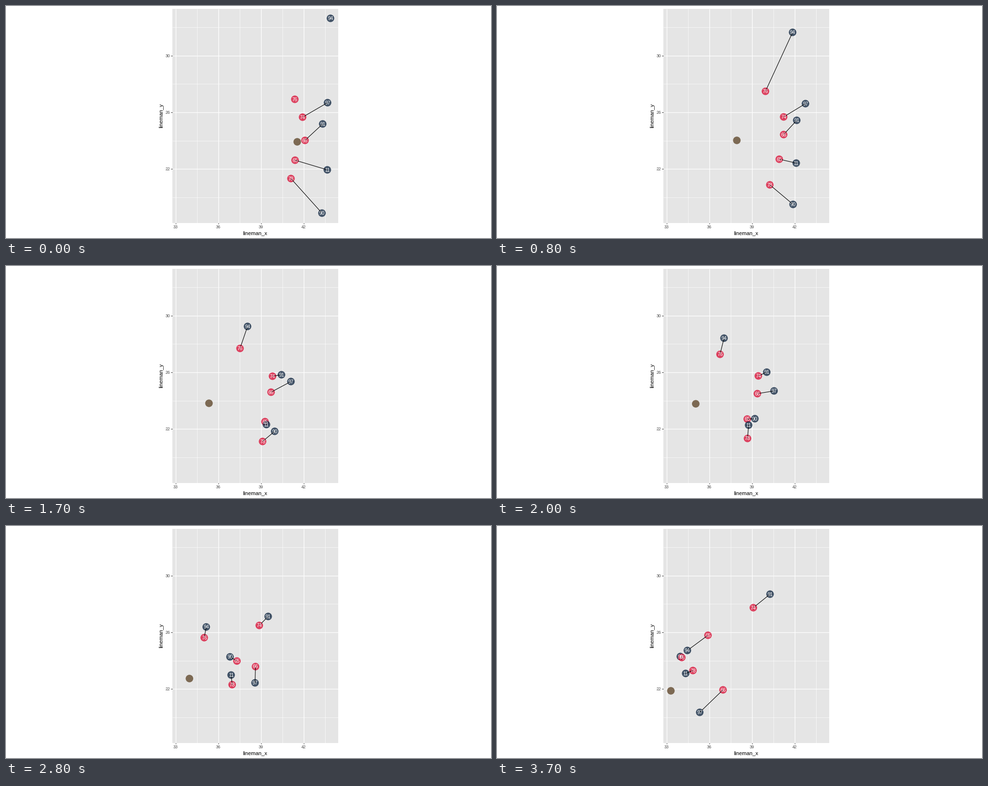
Animation, 1000 px wide and 480 px high, one loop 4300 ms. Source, as a matplotlib script:

```python
from itertools import permutations

import matplotlib.pyplot as plt
import numpy as np
from matplotlib.animation import FuncAnimation
from matplotlib.patches import Circle, Rectangle

W, H, DPI = 1000, 480, 100
PX = 72 / DPI
FRAMES, STEP = 43, 100
UNIT = 88 / 3          # pixels per axis unit
REACH = 5 * UNIT       # pairs further apart are not joined
RED, BLUE, BROWN = "#da183d", "#182d47", "#624a2e"
ALPHA = 0.8

# Waypoints in stage pixels at the shared key times
KEYS = np.array([0, 8, 13, 17, 23, 32, 37])
BLOCKERS = {
    "66": [(616.5, 278), (591, 266), (567.5, 259), (546.5, 261), (529, 270), (498, 312), (466, 339)],
    "74": [(611.5, 230), (591, 229.5), (569.5, 229.5), (549.5, 228), (531, 224.5), (521, 187.5), (528.5, 169)],
    "76": [(595.5, 193), (553.5, 176.5), (519, 168), (482.5, 170.5), (440, 199.5), (390.5, 254), (381, 272)],
    "65": [(596, 319), (582, 317), (561, 322), (534, 322), (499.5, 307), (458.5, 254), (435, 226)],
    "78": [(587.5, 357), (562.5, 370), (545.5, 370), (529, 363), (502, 349), (436, 312), (404, 299)],
}
RUSHERS = {
    "90": [(651.5, 428.5), (610.5, 410.5), (583, 385), (554, 342), (508, 295), (423.5, 263), (378, 270)],
    "94": [(669, 25.5), (609.5, 54.5), (552, 87), (498, 125), (444.5, 171.5), (397.5, 234.5), (392.5, 257.5)],
    "91": [(653, 244), (618, 236.5), (592, 229.5), (568, 225), (548.5, 211.5), (543.5, 165), (563, 141)],
    "97": [(663, 200), (636, 202), (612, 214), (587.5, 239), (553.5, 279.5), (474.5, 358), (418, 385.5)],
    "11": [(662.5, 339), (617, 325), (572, 322), (537, 328), (502, 327), (431, 297), (389, 305)],
}
BALL = [(600.5, 281), (494.5, 278), (445, 279), (418.5, 284), (403.5, 288.5), (361.5, 336), (358.5, 341)]
ORDER = ["66", "90", "74", "76", "94", "91", "65", "78", "97", "11"]


def smooth_path(points, start=1.0):
    """Cubic Hermite path through the waypoints, one row per frame."""
    p = np.array(points, float)
    h = np.diff(KEYS)[:, None]
    s = np.diff(p, axis=0) / h
    v = np.empty_like(p)
    v[1:-1] = (s[:-1] * h[1:] + s[1:] * h[:-1]) / (h[:-1] + h[1:])
    v[0] = start * (1.5 * s[0] - 0.5 * v[1])
    v[-1] = 1.5 * s[-1] - 0.5 * v[-2]
    t = np.minimum(np.arange(FRAMES), KEYS[-1])
    i = np.clip(np.searchsorted(KEYS, t, side="right") - 1, 0, len(h) - 1)
    u = ((t - KEYS[i]) / h[i, 0])[:, None]
    return ((1 + 2 * u) * (1 - u) ** 2 * p[i] + u * (1 - u) ** 2 * h[i] * v[i]
            + u * u * (3 - 2 * u) * p[i + 1] + u * u * (u - 1) * h[i] * v[i + 1])


paths = {n: smooth_path(p, 0.5) for n, p in {**BLOCKERS, **RUSHERS}.items()}
ball_path = smooth_path(BALL)


def best_pairs(f):
    """Blocker-rusher matching with the least total distance."""
    a = np.array([paths[n][f] for n in BLOCKERS])
    b = np.array([paths[n][f] for n in RUSHERS])
    d = np.linalg.norm(a[:, None] - b[None], axis=2)
    rows = np.arange(len(a))
    best = min(permutations(rows), key=lambda q: d[rows, list(q)].sum())
    return [(a[i], b[j], d[i, j] < REACH) for i, j in enumerate(best)]


plt.rcParams["font.family"] = "Liberation Sans"
fig = plt.figure(figsize=(W / DPI, H / DPI), dpi=DPI, facecolor="white")
ax = fig.add_axes([0, 0, 1, 1])
ax.set_xlim(0, W)
ax.set_ylim(H, 0)
ax.axis("off")


def line(x, y, color, width, z):
    return ax.plot(x, y, color=color, lw=width * PX, zorder=z,
                   solid_capstyle="butt")[0]


def label(x, y, s, size, color, ha="center", **kw):
    return ax.text(x, y, s, fontsize=size * PX, color=color, ha=ha,
                   va=kw.pop("va", "baseline"), **kw)


L, R, T, B = 343, 685, 5.5, 448.5
ax.add_patch(Rectangle((L, T), R - L, B - T, fc="#e5e5e5", ec="none", zorder=0))
for k in range(4):
    x = 349.5 + 88 * k
    line([x + 44] * 2, [T, B], "white", 0.65, 1)
    line([x, x], [T, B], "white", 1.25, 2)
    line([x, x], [B, B + 2.8], "#333333", 1.1, 2)
    label(x, 460.3, str(33 + 3 * k), 8.8, "#4d4d4d")
for k in range(4):
    line([L, R], [44 + 4 * UNIT * k] * 2, "white", 0.65, 1)
for k in range(3):
    y = 102.6 + 4 * UNIT * k
    line([L, R], [y, y], "white", 1.25, 2)
    line([L - 2.8, L], [y, y], "#333333", 1.1, 2)
    label(338, y + 3.2, str(30 - 4 * k), 8.8, "#4d4d4d", ha="right")
label(513.7, 473, "lineman_x", 11, "black")
label(320, 227.2, "lineman_y", 11, "black", rotation=90, va="center")


def dot(color, z):
    return ax.add_patch(Circle((0, 0), 7.8, fc=color, ec="none", alpha=ALPHA, zorder=z))


dots = {n: dot(RED if n in BLOCKERS else BLUE, 3 + 0.05 * i)
        for i, n in enumerate(ORDER)}
ball = dot(BROWN, 3.9)
links = [line([], [], "black", 1.1, 4) for _ in BLOCKERS]
tags = {n: label(0, 0, n, 10.2, "white", zorder=5) for n in ORDER}


def draw(f):
    for n in ORDER:
        x, y = paths[n][f]
        dots[n].center = x, y
        tags[n].set_position((x, y + 3.6))
    ball.center = tuple(ball_path[f])
    for link, (p, q, near) in zip(links, best_pairs(f)):
        link.set_data([p[0], q[0]], [p[1], q[1]])
        link.set_visible(bool(near))
    return [*dots.values(), ball, *links, *tags.values()]


anim = FuncAnimation(fig, draw, frames=FRAMES, interval=STEP, repeat=True,
                     repeat_delay=0, blit=False)
plt.show()
```
